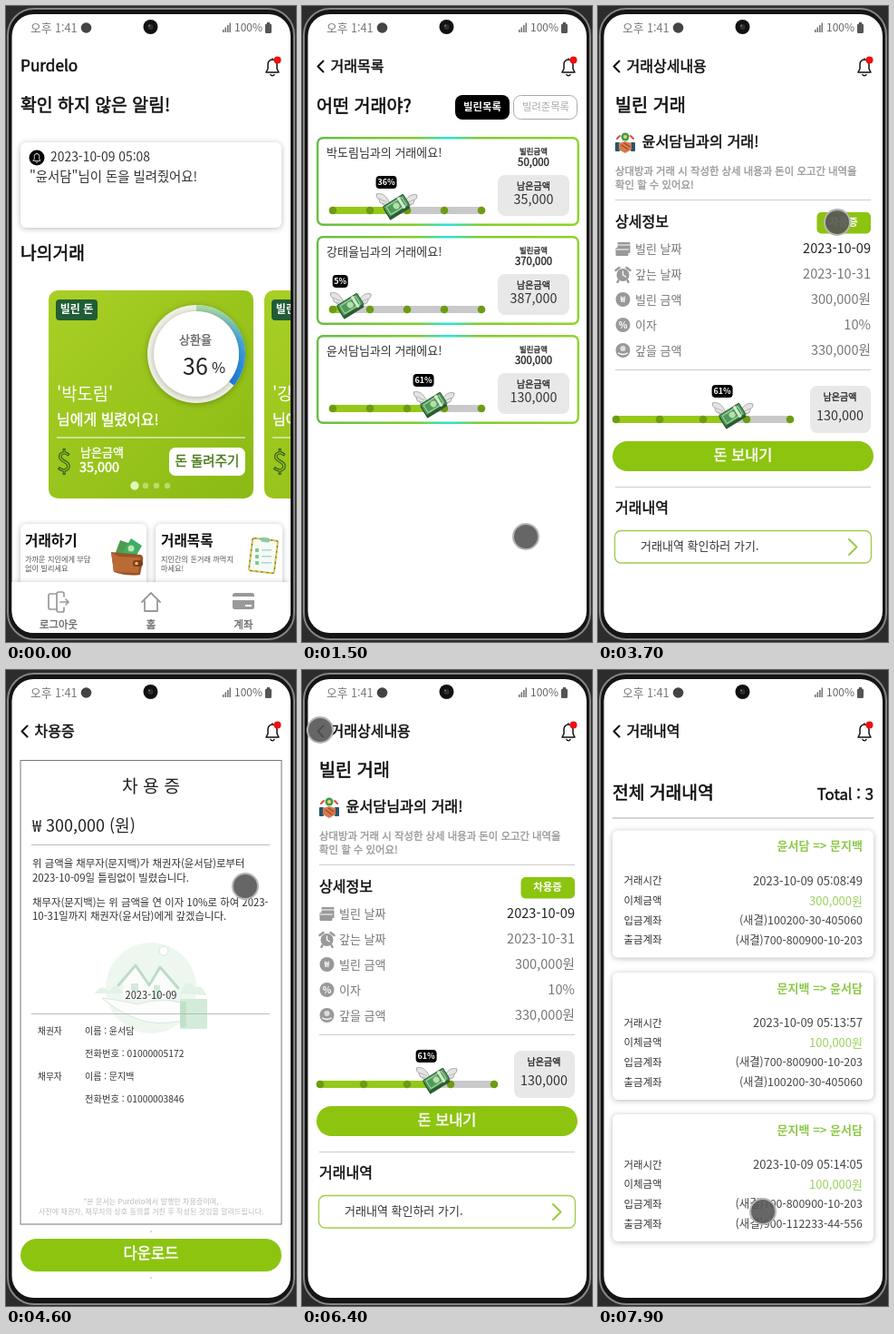
An HTML page for the animation above (8 s loop, 320 px wide and 700 px high).

```html
<!DOCTYPE html>
<html lang="ko">
<head>
<meta charset="utf-8">
<style>
html, body { margin: 0; width: 100%; height: 100%; overflow: hidden; background: #2c2c2c; }
svg { display: block; width: 320px; height: 700px; font-family: "Noto Sans CJK KR", "Noto Sans CJK", sans-serif; }
.shadow { filter: drop-shadow(0 1px 3px #0004); }
</style>
</head>
<body>
<svg id="stage" viewBox="0 0 320 700"></svg>
<script>
const BRAND = 'Purdelo';
const LENDER = '윤서담', BORROWER = '문지백', FRIEND = '박도림', PAL = '강태율';
const GREEN = '#8cc410', GRAY = '#777', INK = '#222';

// Text is placed by its vertical centre; a thin outline gives the medium weight.
const text = (x, cy, size, str, fill = INK, weight = 400, anchor = 'start') =>
  `<text x="${x}" y="${(cy + size * .37).toFixed(2)}" font-size="${size}" fill="${fill}" text-anchor="${anchor}" xml:space="preserve" ${
    weight === 500 ? `stroke="${fill}" stroke-width="${size * .03}"` : `font-weight="${weight}"`}>${str}</text>`;
const mid = (x, cy, size, str, fill, weight) => text(x, cy, size, str, fill, weight, 'middle');
const end = (x, cy, size, str, fill, weight) => text(x, cy, size, str, fill, weight, 'end');
const box = (x1, y1, x2, y2, r, fill, extra = '') =>
  `<rect x="${x1}" y="${y1}" width="${x2 - x1}" height="${y2 - y1}" rx="${r}" fill="${fill}" ${extra}/>`;
const dot = (x, y, r, fill, extra = '') => `<circle cx="${x}" cy="${y}" r="${r}" fill="${fill}" ${extra}/>`;
const stroke = (d, color, width = 1) =>
  `<path d="${d}" fill="none" stroke="${color}" stroke-width="${width}" stroke-linecap="round" stroke-linejoin="round"/>`;
const shape = (d, fill) => `<path d="${d}" fill="${fill}"/>`;
const at = (x, y, body, more = '') => `<g transform="translate(${x} ${y}) ${more}">${body}</g>`;
const rule = (x1, x2, y, color = '#ccc') => box(x1, y - .5, x2, y + .5, 0, color);
const panel = (x1, y1, x2, y2) => box(x1, y1, x2, y2, 6, '#fff', 'class="shadow"');

const bell = stroke('M-7 6H7L5 2V-3A5 5 0 0 0-5-3V2ZM-2 8.5A2.2 2.2 0 0 0 2 8.5M0-8V-9', '#111', 1.5);
const header = title =>
  (title ? stroke('M23.5 60.5L17.5 66.5L23.5 72.5', '#111', 2) + text(31.5, 66, 16, title, '#111', 500)
         : text(16, 66, 17.2, BRAND, '#111', 500)) +
  at(294, 67, bell) + dot(299.5, 59.5, 4, '#f01010');

const bill = `<g transform="rotate(-32)">
  ${box(-14, -5, 12, 10, 1, '#2c5a35')}${box(-13, -7, 13, 7, 1, '#4f9a5b', 'stroke="#2c5a35"')}
  ${box(-10, -5, 10, 5, 1, 'none', 'stroke="#a8d9a0"')}${dot(0, 0, 3.5, '#b5dfaa')}${box(5, -7, 8, 7, 0, '#d7ebce')}</g>`;
const wing = '<path d="M-7-2C-10-11-16-15-22-13Q-22-9-19-7Q-19-3-15-2Q-13 2-7 2Z" fill="#e4e4e4" stroke="#999" stroke-width=".8"/><path d="M-19-8L-10-4M-16-3L-9-1" stroke="#aaa" stroke-width=".8"/>';
const money = wing + `<g transform="translate(1 1) scale(-1 1)">${wing}</g>` + bill;

function progress(x, y, length, percent) {
  const p = x + length * percent / 100, half = percent < 10 ? 8.5 : 11.5;
  let dots = '';
  for (let i = 0; i < 5; i++) dots += dot(x + length * i / 4, y, 4.3, '#6d9c10');
  return box(x - 4, y - 4, x + length + 4, y + 4, 4, '#c9c9cb') + box(x - 4, y - 4, p + 8, y + 4, 4, '#96c81a') + dots +
    at(p + 11, y - 5, money) +
    box(p - half, y - 38, p + half, y - 24, 4, '#000') + mid(p, y - 31, 9, percent + '%', '#fff', 700);
}

function loanCard(x, name, gauge) {
  return at(x, 0, box(47, 313, 273, 542, 10, 'url(#lime)') +
    box(55, 323, 101, 346, 4, '#205c36') + mid(78, 334, 12, '빌린 돈', '#fff', 700) + gauge +
    text(56, 427, 18.8, `'${name}'`, '#fff') + text(56, 455, 16, '님에게 빌렸어요!', '#fff', 500) +
    rule(56, 264, 475, '#fff') +
    mid(64, 501, 29, '$', 'none').replace('<text', '<text stroke="#35601c" stroke-width="1.2"') +
    text(82, 491, 13, '남은금액', '#fff', 500) + text(81, 508, 14.4, '35,000', '#fff', 500) +
    box(180, 486, 264, 517, 7, '#fff') + mid(222, 501, 14.5, '돈 돌려주기', '#4a7a18', 500) +
    dot(142, 528, 4.7, '#e2f6bd') + [154, 166, 178].map(d => dot(d, 528, 3.2, '#bedb68')).join(''));
}

const gauge = dot(210, 383, 54, '#eef1e3', 'class="shadow"') +
  '<path d="M210 332.5A50.5 50.5 0 0 1 248.7 415.5" fill="none" stroke="url(#ring)" stroke-width="7"/>' +
  dot(210, 383, 47, '#fff', 'class="shadow"') + mid(209, 367, 13, '상환율', '#666', 500) +
  text(195, 397, 25, '36') + text(227, 398, 16.5, '%');

const wallet = shape('M-14-2L-8-18L4-14L0 0Z', '#4e9b50') + shape('M-6-4L4-20L16-12L8 2Z', '#3fae63') +
  dot(4, -9, 3.5, '#bfe5b0') + shape('M-18-5L15-2Q18 0 17 4L14 20Q0 22-15 17Z', '#9a5328') +
  shape('M-18-5L-10 0L14 1L12 18L-15 17Z', '#b96a35') + box(6, 4, 17, 11, 3, '#7b3d1b') + dot(10, 7.5, 1.8, '#f0c04a');
const clipboard = `<g transform="rotate(7)">${box(-14, -18, 14, 18, 2, '#f4fbf6', 'stroke="#e3c04c" stroke-width="2"')}
  ${box(-14, -18, 14, 18, 2, 'none', 'stroke="#35764f" stroke-width="1" stroke-dasharray="2 4"')}
  ${box(-5, -20, 5, -15, 2, '#8cc9a0')}</g>` +
  [-8, -1, 6].map(y => box(-9, y, -5, y + 4, 1, '#7cc98a') + box(-2, y + 1, 9, y + 2.5, 0, '#b5d2cb')).join('');

const home = header() +
  text(16, 109, 19.4, '확인 하지 않은 알림!', '#111', 500) + panel(16, 150, 304, 244) +
  dot(34, 167, 8.5, '#000') + at(34, 167, bell.replace('#111', '#fff'), 'scale(.55)') +
  text(49, 166, 13.9, '2023-10-09 05:08', '#333') +
  text(26, 188, 14.4, `"${LENDER}"님이 돈을 빌려줬어요!`, '#333') +
  text(16, 272, 19.3, '나의거래', '#111', 500) +
  loanCard(0, FRIEND, gauge) + loanCard(238, PAL, '') +
  panel(16, 570, 155, 660) + text(21, 588, 15.7, '거래하기', '#111', 700) +
  text(21, 609, 8.2, '가까운 지인에게 부담', '#555') + text(21, 619, 8.2, '없이 빌리세요', '#555') + at(134, 606, wallet) +
  panel(165, 570, 305, 660) + text(171, 588, 15.7, '거래목록', '#111', 700) +
  text(171, 609, 8.2, '지인간의 돈거래 까먹지', '#555') + text(171, 619, 8.2, '마세요!', '#555') + at(284, 605, clipboard) +
  box(6, 634, 314, 700, 0, '#fff', 'class="shadow"') +
  stroke('M56 647H49Q47 647 47 649V662Q47 664 49 664H56M64 650V647Q64 645 62 645H58Q56 645 56 647V664Q56 667 58 667H62Q64 667 64 665V662M60 656H69M66 653L69 656L66 659', '#999', 1.7) +
  stroke('M150 656L160 646L170 656M153 655V666H167V655', '#999', 1.8) +
  box(250, 646, 274, 664, 2.5, '#999') + box(250, 650, 274, 654, 0, '#fff') + box(264, 659, 271, 661, 0, '#fff') +
  mid(58, 681, 11.4, '로그아웃', '#666', 500) + mid(160, 681, 11.4, '홈', '#666', 500) + mid(262, 681, 11.4, '계좌', '#666', 500);

const dealCard = (y, name, percent, total, left) => at(0, y,
  box(17.2, 1.2, 304.8, 96.8, 6, '#fff', 'stroke="url(#edge)" stroke-width="2.4"') +
  text(27, 17, 13, name + '님과의 거래에요!', '#333') + progress(34, 81, 164, percent) +
  mid(255.5, 16, 8.4, '빌린금액', INK, 500) + mid(255.5, 27.5, 11.4, total, INK, 500) +
  box(216, 42, 295, 87, 8, '#e8e8e9') + mid(255.5, 54, 10, '남은금액', INK, 500) + mid(255.5, 69, 14.4, left, '#333'));

const list = header('거래목록') + text(16, 110, 19.6, '어떤 거래야?', '#111', 500) +
  box(169, 98, 229, 125, 8, '#000') + mid(199, 111, 11.4, '빌린목록', '#fff', 700) +
  box(233.5, 98.5, 303.5, 124.5, 8, '#fff', 'stroke="#aaa"') + mid(269, 111, 11.3, '빌려준목록', '#aaa') +
  dealCard(144, FRIEND, 36, '50,000', '35,000') +
  dealCard(253, PAL, 5, '370,000', '387,000') +
  dealCard(362, LENDER, 61, '300,000', '130,000');

const icons = [
  box(-6, -7, 8, 5, 1, '#999') + box(-8, -1, 6, 8, 1, '#999') + stroke('M-6-4H8M-7 1H6', '#fff'),
  dot(0, 1, 7, '#999') + stroke('M-8-4L-4-7M8-4L4-7M-5 7L-6 9M5 7L6 9', '#999', 2.5) + stroke('M0-3V1L3 3', '#fff', 1.3),
  dot(0, 0, 8, '#999') + mid(0, 0, 9, '₩', '#fff', 700),
  dot(0, 0, 8, '#999') + mid(0, 0, 10, '%', '#fff', 700),
  dot(0, 0, 8, '#999') + dot(0, -2, 3, '#ddd') + stroke('M-5 3Q0 6 5 3', '#fff', 1.3)
];
const details = [['빌린 날짜', '2023-10-09'], ['갚는 날짜', '2023-10-31'], ['빌린 금액', '300,000원'], ['이자', '10%'], ['갚을 금액', '330,000원']];
const handshake = dot(0, -7, 4.5, '#3d9a50') + dot(0, -7, 2, '#f2d35b') +
  box(-11, -1, -6, 9, 1, '#27566d') + box(6, -1, 11, 9, 1, '#27566d') +
  shape('M-7 0L0-2L7 0V7L0 11L-7 7Z', '#d87949') + stroke('M-4 2L3 7M-1 0L5 4', '#7c3a24') + stroke('M-9-5L-6-8M9-5L6-8', '#e04b3a', 2);

const detail = header('거래상세내용') + text(19, 109, 19.7, '빌린 거래', '#111', 500) +
  at(30, 151, handshake) + text(48.5, 149, 16.2, LENDER + '님과의 거래!', '#111', 500) +
  text(19, 182, 11.4, '상대방과 거래 시 작성한 상세 내용과 돈이 오고간 내역을', '#999', 500) +
  text(19, 197, 11.4, '확인 할 수 있어요!', '#999', 500) + rule(19, 301, 213.5) +
  text(19, 237, 16, '상세정보', '#111', 500) +
  box(241.5, 227, 301, 250.5, 5, GREEN) + mid(271, 238, 11.5, '차용증', '#fff', 700) +
  details.map(([label, value], i) => at(0, 267 + 28 * i, at(27.5, 0, icons[i]) +
    text(41, 0, 13, label, GRAY) + end(301, 0, 14.6, value, i ? GRAY : INK))).join('') +
  rule(19, 301, 400.5) + progress(20, 455, 192, 61) +
  box(234, 418, 301, 470, 8, '#e8e8e9') + mid(267, 430, 10, '남은금액', INK, 500) + mid(267, 451, 14.4, '130,000', '#333') +
  box(16, 479, 304, 512, 16.5, GREEN) + mid(160, 494, 16.4, '돈 보내기', '#fff', 500) +
  rule(19, 301, 529.5) + text(19, 552, 16, '거래내역', '#111', 500) +
  box(18.5, 577.5, 301.5, 613, 7, '#fff', 'stroke="#9fce4e" stroke-width="1.4"') +
  text(47, 594, 13, '거래내역 확인하러 가기.', '#333') + stroke('M277 587L285.5 595.5L277 604', '#9ccb45', 2);

const houseArt = dot(160, 350, 50, '#edf7f0') + dot(174, 309, 5, '#fff', 'stroke="#d5e8da"') +
  shape('M98 356Q105 344 114 354Q120 341 129 356Z', '#e3f2e7') + shape('M192 356Q200 336 209 350Q216 345 221 358Z', '#e3f2e7') +
  shape('M129 362V343L143 326L157 345L169 328L185 346V362Z', '#fafcfa') +
  stroke('M124 347L143 325L158 347L170 327L190 350', '#bddcc7', 3) +
  box(138, 345, 146, 353, 0, '#d5e9db') + box(163, 347, 170, 362, 0, '#d5e9db') +
  '<path d="M106 361Q130 364 145 368Q170 360 194 366V386Q165 392 145 384Q122 375 106 361Z" fill="#fcfdfc" stroke="#d9e6dd"/>' +
  box(192, 362, 222, 395, 1, '#d3ebd9') + box(192, 365, 199, 393, 0, '#c0e2c9');

const party = (y, role, name, phone) => text(35, y, 9.7, role, '#333') +
  text(87, y, 10, '이름 : ' + name, '#333') + text(87, y + 25.5, 10.3, '전화번호 : ' + phone, '#333');
const contract = header('차용증') + at(0, -1,
  box(16, 99.5, 304, 610, 0, '#fff', 'stroke="#777"') + mid(160, 128, 19.3, '차 용 증') +
  text(29, 171, 18, '₩ 300,000 (원)') + rule(28, 291, 192.5, '#bbb') +
  [[213, `위 금액을 채무자(${BORROWER})가 채권자(${LENDER})로부터`], [228.5, '2023-10-09일 틀림없이 빌렸습니다.'],
   [255.5, `채무자(${BORROWER})는 위 금액을 연 이자 10%로 하여 2023-`], [271, `10-31일까지 채권자(${LENDER})에게 갚겠습니다.`]]
    .map(([y, line]) => text(29, y, 11.4, line, '#333')).join('') +
  houseArt + mid(160, 358, 11.1, '2023-10-09', '#333') + rule(28, 291, 378.5, '#bbb') +
  party(397, '채권자', LENDER, '01000005172') + party(447, '채무자', BORROWER, '01000003846') +
  mid(160, 585, 8.1, `*본 문서는 ${BRAND}에서 발행한 차용증이며,`, '#bbb') +
  mid(160, 596, 8.1, '사전에 채권자, 채무자의 상호 동의를 거친 후 작성된 것임을 알려드립니다.', '#bbb') +
  dot(160, 618, .8, '#aaa') + dot(160, 669, .8, '#aaa') +
  box(16, 626, 304, 662, 18, GREEN) + mid(160, 642, 16.6, '다운로드', '#fff', 500));

const MINE = '(새결)700-800900-10-203', THEIRS = '(새결)100200-30-405060', OTHER = '(새결)900-112233-44-556';
const transfer = (y, from, to, time, amount, into, out) => at(0, y, panel(16, 0, 304, 140) +
  end(292, 17, 13, `${from} =&gt; ${to}`, '#8fc94b', 700) +
  [['거래시간', '2023-10-09 ' + time], ['이체금액', amount], ['입금계좌', into], ['출금계좌', out]].map(([label, value], i) =>
    text(28.5, 55.5 + 21.7 * i, 11.4, label, '#333') +
    end(292, 55.5 + 21.7 * i, i < 2 ? 13 : 12.4, value, i === 1 ? '#9bcf5c' : '#444')).join(''));
const history = header('거래내역') + at(0, -1,
  text(16, 135, 19.3, '전체 거래내역', '#111', 500) + end(304, 137, 16.8, 'Total : 3', '#111', 500) + rule(16, 304, 163, '#aaa') +
  transfer(176.5, LENDER, BORROWER, '05:08:49', '300,000원', THEIRS, MINE) +
  transfer(333, BORROWER, LENDER, '05:13:57', '100,000원', MINE, THEIRS) +
  transfer(489, BORROWER, LENDER, '05:14:05', '100,000원', MINE, OTHER));

const statusBar = text(27, 24, 12.7, '오후 1:41', GRAY) + dot(88.5, 24, 5.8, '#444') +
  dot(159.5, 23, 8, '#111') + dot(159.5, 23, 3, '#2b2d38') + dot(158, 21.5, 1, '#777') +
  [0, 1, 2, 3].map(i => box(239 + 2.5 * i, 26 - 2.5 * i, 240.6 + 2.5 * i, 29, 0, '#777')).join('') +
  text(252, 24, 12, '100%', '#666') + box(286, 19.5, 293, 30, 1.5, '#555') + box(288, 18, 291, 20, 0, '#555');

const screens = { home, list, detail, contract, history };
const stage = document.getElementById('stage');
const stops = list => list.map(([offset, color]) => `<stop offset="${offset}" stop-color="${color}"/>`).join('');
stage.innerHTML = `<defs>
  <linearGradient id="lime" x2="1" y2="1">${stops([[0, '#a9cf25'], [1, '#8aba14']])}</linearGradient>
  <linearGradient id="ring" x2="0" y2="1">${stops([[0, '#a5d9a5'], [.45, '#45a5dc'], [1, '#1c80e4']])}</linearGradient>
  <linearGradient id="edge">${stops([[0, '#68bd45'], [.38, '#82cd2c'], [.5, '#25e6dc'], [.62, '#82cd2c'], [1, '#8ed32c']])}</linearGradient>
  <clipPath id="glass">${box(6.5, 9, 314, 690, 24, '#fff')}</clipPath></defs>
  <g id="phone">${box(2, 3, 318, 697, 29, '#151515', 'stroke="#858585" stroke-width="2"')}
  <g clip-path="url(#glass)">${box(0, 0, 320, 700, 0, '#fff')}
  ${Object.entries(screens).map(([id, body]) => `<g id="${id}">${body}</g>`).join('')}${statusBar}</g></g>
  <circle id="touch" r="14" fill="#555" fill-opacity=".9" stroke="#b5b5b5" stroke-width="2"/>`;

const cuts = [[0, 'home'], [1300, 'list'], [2900, 'detail'], [4200, 'contract'], [6400, 'detail'], [7600, 'history']];
const path = [[500, 336, 645], [1000, 247, 584], [1900, 247, 584], [2500, 171, 402], [3000, 171, 402], [3600, 264, 238],
  [4600, 264, 238], [5200, 281, 650], [5450, 281, 650], [5700, 36, 86], [6000, 20, 66], [6650, 20, 66],
  [7200, 190, 580], [7500, 184, 600], [7900, 182, 596], [8000, 182, 596]];
const get = id => document.getElementById(id);

function touchAt(time) {
  const i = path.findIndex(p => p[0] > time);
  if (i < 1) return path[0].slice(1);
  const a = path[i - 1], b = path[i];
  const u = (time - a[0]) / (b[0] - a[0]), k = u * u * (3 - 2 * u);
  return [a[1] + (b[1] - a[1]) * k, a[2] + (b[2] - a[2]) * k];
}

function draw() {
  const time = performance.now() % 8000;
  const current = cuts.filter(c => c[0] <= time).pop()[1];
  for (const id in screens) get(id).style.display = id === current ? '' : 'none';
  get('phone').setAttribute('transform', `translate(0 ${time >= 4600 ? 1 : 0})`);
  get('touch').setAttribute('transform', `translate(${touchAt(time)})`);
  requestAnimationFrame(draw);
}
draw();
</script>
</body>
</html>
```
